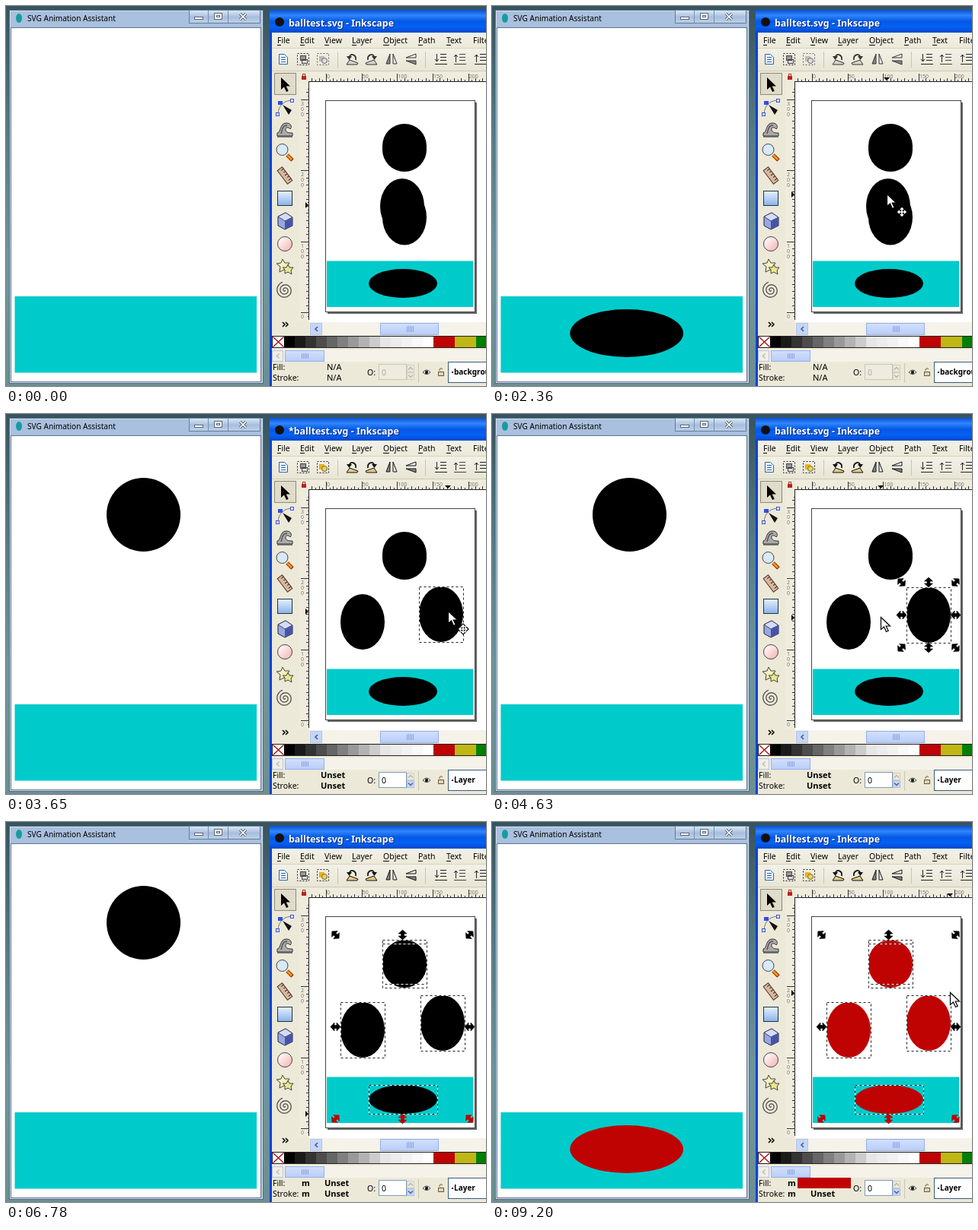
Animation of 630 by 500 pixels, one loop 9.3 s. Source, as an HTML page with a canvas:

```html
<!DOCTYPE html>
<html lang="en">
<head>
<meta charset="utf-8">
<title>Ball test</title>
<style>
html, body { margin: 0; width: 100%; height: 100%; overflow: hidden; }
canvas { display: block; }
</style>
</head>
<body>
<canvas id="stage" width="630" height="500"></canvas>
<script>
const g = document.getElementById('stage').getContext('2d');
const LOOP = 9300, TEAL = '#00cbcb', RED = '#bf0303', FACE = '#ece9d8';
const FONT = '"Noto Sans", "Open Sans", sans-serif';

// Cursor path: time, x, y
const PATH = [
  [670, 589, 55], [1150, 253, 450], [1520, 253, 450], [2240, 500, 236], [2360, 518, 248],
  [2400, 518, 248], [2900, 466, 258], [2980, 466, 258], [3210, 532, 274.5], [3260, 532, 274.5],
  [3650, 580, 260], [3700, 582, 261], [4220, 582, 261], [4860, 470, 272], [5070, 478, 277],
  [5160, 482, 277], [5240, 483, 270], [5440, 483, 270], [5520, 502, 180], [5600, 482, 191],
  [6180, 500, 360], [6400, 500, 360], [6690, 603, 384]
];
const PATH2 = [
  [7640, 606, 367], [7780, 560, 312], [8400, 560, 312], [8900, 608, 240], [9200, 601, 225]
];
// Preview poses: c top, l left, s squashed, r right, - empty
const POSES = `0- 1880c 2110l 2330s 2555r 2780c 3000l 3225s 3450r 3640c 3875l 4100s 4320r
  4540c 4760l 4960s 5070- 5160c 5440l 5560s 5800r 6020c 6240l 6440s 6620r 6780c 7070l
  7320s 7500r 7740c 7980l 8190s 8400r 8650c 8860l 9080s`
  .split(/\s+/).map(s => [parseInt(s), s.slice(-1)]);

function rect(x, y, w, h, fill) { g.fillStyle = fill; g.fillRect(x, y, w, h); }
function frame(x, y, w, h, color) {
  g.strokeStyle = color; g.lineWidth = 1; g.strokeRect(x + .5, y + .5, w - 1, h - 1);
}
function fade(x, y, w, h, ...colors) {
  const f = g.createLinearGradient(0, y, 0, y + h);
  colors.forEach((c, i) => f.addColorStop(i / (colors.length - 1), c));
  rect(x, y, w, h, f);
}
function oval(x, y, rx, ry, fill, stroke) {
  g.beginPath(); g.ellipse(x, y, rx, ry, 0, 0, 7);
  if (fill) { g.fillStyle = fill; g.fill(); }
  if (stroke) { g.strokeStyle = stroke; g.lineWidth = 1; g.stroke(); }
}
function shape(x, y, d, fill, stroke, width = 1, angle = 0) {
  const p = new Path2D(d);
  g.save(); g.translate(x, y); g.rotate(angle);
  if (fill) { g.fillStyle = fill; g.fill(p); }
  if (stroke) { g.strokeStyle = stroke; g.lineWidth = width; g.stroke(p); }
  g.restore();
}
function text(s, x, y, size = 10.5, color = '#000', weight = '') {
  g.font = `${weight} ${size}px ${FONT}`; g.fillStyle = color; g.fillText(s, x, y);
}
function along(path, t) {
  let i = 0;
  while (i < path.length - 2 && t > path[i + 1][0]) i++;
  const [a, ax, ay] = path[i], [b, bx, by] = path[i + 1];
  const k = Math.min(1, Math.max(0, (t - a) / (b - a)));
  return [ax + (bx - ax) * k, ay + (by - ay) * k];
}

function pointer(t) {
  if (t >= 670 && t < 6730) return along(PATH, t);
  if (t >= 7640) return along(PATH2, t);
}
function drag(t, from, to, start, end) {
  const [x, y] = along([[start, ...from], [end, ...to]], t);
  return { x, y, rx: 29, ry: 36.5 };
}
function scene(t) {
  const a = drag(t, [520, 263.5], [468, 273.5], 2400, 2900);
  const b = t < 3650 ? drag(t, [523, 278], [571, 263.5], 3260, 3650)
    : drag(t, [571, 263.5], [573, 264.5], 3650, 3700);
  const top = [184, 189].map(y => ({ x: 523, y, rx: 29, ry: 29 }));
  const flat = { x: 521, y: 365, rx: 45, ry: 19 };
  const picked = [];
  if ((t >= 2400 && t < 3260) || t >= 4860) picked.push(a);
  if (t >= 3260) picked.push(b);
  if (t >= 5500) picked.push(...top);
  if (t >= 6180) picked.push(flat);
  return {
    all: [...top, b, a, flat], picked,
    dragging: (t >= 2400 && t < 2900) || (t >= 3260 && t < 3700),
    dirty: (t >= 2420 && t < 3900) || (t >= 7320 && t < 7640)
  };
}

function preview(t, active) {
  fade(4, 5, 334, 492, ...(active ? ['#b4d0ef', '#7fa9d8'] : ['#a9c0de', '#a3bbdc']));
  frame(4, 5, 334, 492, '#53677f');
  frame(5, 6, 332, 490, '#d2e0f1');
  oval(17, 16, 4, 6, '#159ca0');
  text('SVG Animation Assistant', 28, 20, 10.1);
  fade(241, 6, 92, 17, '#dbe7f5', '#a7bfdd', '#bed2ea');
  frame(240, 5, 94, 18, '#667c98');
  rect(265, 6, 1, 16, '#7890ae'); rect(291, 6, 1, 16, '#7890ae');
  rect(248, 14, 11, 4, '#fff'); frame(247, 14, 12, 4, '#596675');
  rect(273, 10, 10, 8, '#fff'); frame(273, 9, 11, 9, '#596675'); frame(276, 12, 5, 3, '#596675');
  shape(311, 14, 'M-4-4L4 4M4-4L-4 4', 0, '#596675', 3.6);
  shape(311, 14, 'M-4-4L4 4M4-4L-4 4', 0, '#fff', 1.6);
  rect(7, 29, 328, 466, '#fff'); frame(6, 28, 329, 467, '#60748d');
  rect(11.5, 382, 317.5, 100.5, TEAL);
  const pose = POSES.filter(p => p[0] <= t).pop()[1];
  const moved = t >= 4220;
  const spot = {
    c: [180.5, 132.5, 48.5, 48.5],
    l: moved ? [89.5, 280.5, 48.5, 60.5] : [175, 264, 48.5, 60.5],
    s: [176.7, 430.5, 74.4, 31.5],
    r: moved ? [263, 265, 48.5, 60.5] : [180.5, 288, 48.5, 60.5]
  }[pose];
  if (spot) oval(...spot, t >= 8020 ? RED : '#000');
}

function toolbar(enabled) {
  // New document, select all, select in layers, deselect
  shape(364, 70, 'M-5.5-6.5H1.5L5.5-2.5V6.5H-5.5Z', '#f4f9ff', '#2864a8');
  shape(364, 70, 'M-3-2.5H3M-3 .5H3M-3 3.5H3', 0, '#2864a8');
  g.setLineDash([2, 2]);
  frame(382, 62, 16, 16, '#222'); frame(408, 62, 16, 16, enabled ? '#222' : '#666');
  g.setLineDash([]);
  rect(386, 65, 7, 6, '#999'); rect(388, 70, 8, 6, '#ddd'); frame(386, 65, 8, 7, '#444'); frame(388, 70, 8, 6, '#444');
  rect(411, 66, 7, 7, enabled ? '#e9b51c' : '#bbb'); oval(418, 72, 3.5, 3.5, enabled ? '#f1d33f' : '#ddd', '#666');
  rect(435, 60, 1, 21, '#c9c5b3'); rect(550, 60, 1, 21, '#c9c5b3');
  const ink = enabled ? '#111' : '#333', tint = enabled ? '#e0c98a' : '#d5d5d0';
  for (const [x, s] of [[454, 1], [480, -1]]) {
    g.save(); g.translate(x, 70); g.scale(s, 1);
    shape(0, 0, 'M-7 7L-3 1 8 5 7 7Z', tint, ink);
    shape(0, 0, 'M5 1C6-6-1-8-3-4', 0, ink, 1.8);
    shape(0, 0, 'M-7-4H0L-3.5 1Z', ink);
    g.restore();
  }
  for (const [x, a] of [[506, 0], [532, -Math.PI / 2]]) {
    shape(x, 70, 'M-2-7V6H-7Z', '#888', ink, 1, a);
    shape(x, 70, 'M2-7V6H7Z', '#eee', ink, 1, a);
  }
  [571, 596, 623].forEach((x, i) => {
    shape(x, 70, 'M-1-6.5H7M-1-2.5H7M-1 1.5H7M-8 6.5H8', 0, i == 1 ? '#444' : '#222', 1);
    shape(x, 70, i ? 'M-5.5 4V-6M-8-3L-5.5-6-3-3' : 'M-5.5-7V3M-8 0L-5.5 3-3 0', 0, '#222', 1);
  });
}

const ARROW = 'M0 0V16L4 12.5 7 19 9.7 17.7 6.7 11.5H12Z';
function tools() {
  rect(352, 88, 29, 29, '#e0dcca'); frame(352, 88, 29, 29, '#8d8a7c');
  shape(361, 94, ARROW, '#000');
  // Node editor
  shape(366, 133, 'M-9 9C-8-4 0-9 11-9', 0, '#777');
  shape(366, 133, 'M-3-3L9 4 5 10Z', '#111');
  [[355, 140, '#eef'], [358, 125, '#3050f0'], [374, 122, '#eef']].forEach(([x, y, c]) => {
    rect(x, y, 5, 5, c); frame(x - 1, y, 5, 5, '#3450d8');
  });
  // Tweak
  shape(366, 163, 'M-10 4C-5 4-7-9 2-9 8-9 10-4 7-1 5-4 0-4 1 0 2 4 6 4 10 4V8H-10Z', '#aaa', '#333');
  shape(366, 163, 'M-10 9H10M-5 5C-3-3-2-6 3-6', 0, '#555', 1.4);
  // Zoom
  shape(366, 193, 'M3 3L10 10', 0, '#a33a00', 5); shape(366, 193, 'M3 3L9 9', 0, '#ef9b25', 2.5);
  oval(362.5, 189, 7.5, 7.5, '#d8e9f7', '#444');
  // Measure
  shape(366, 223, 'M-4-11H4V11H-4Z', '#d8b99c', '#533', 1, -.65);
  shape(366, 223, 'M0-8H4M1-4H4M0 0H4M1 4H4M0 8H4', 0, '#422', 1, -.65);
  // Rectangle, box, ellipse
  fade(357, 244, 18, 18, '#e3f0ff', '#8cb4ea'); frame(356, 243, 20, 20, '#234');
  shape(366, 283, 'M-9-6L1-11 10-5V6L0 11-9 6Z', '#98a6e4', '#223');
  shape(366, 283, 'M-9-6L1-11 10-5 0 0Z', '#d5dcfa', '#446');
  shape(366, 283, 'M0 0L10-5V6L0 11Z', '#4655a8');
  const blush = g.createLinearGradient(358, 305, 374, 321);
  blush.addColorStop(0, '#fff'); blush.addColorStop(1, '#f6b5b5');
  oval(366, 313, 9.5, 9.5, blush, '#444');
  // Star
  shape(366, 343, 'M-3-10L0-5 6-5 3 0 5 6-1 4-7 7-6 0-11-4-5-5Z', '#f4f0bd', '#444');
  shape(370, 346, 'M0-6L2-2 7-2 4 2 5 7 0 4-4 6-4 1-7-2-2-2Z', '#ece68c', '#444');
  // Spiral
  g.beginPath();
  for (let a = 0; a < 17; a += .2) g.lineTo(366 + a * .65 * Math.cos(a), 374 + a * .65 * Math.sin(a));
  g.strokeStyle = '#444'; g.lineWidth = 1.2; g.stroke();
  shape(366, 419, 'M-3-3L0 0-3 3M1-3L4 0 1 3', 0, '#000', 1.5);
}

function rulers(mark) {
  rect(398, 87, 232, 12, '#efecdd'); rect(385, 99, 13, 316, '#efecdd');
  rect(398, 99, 232, 1, '#222'); rect(397, 99, 1, 314, '#222');
  rect(388, 92, 6, 5, '#b22'); frame(389, 89, 4, 4, '#a33');
  for (let i = -4; i < 46; i++) {
    const h = i % 10 == 0 ? 10 : i % 2 ? 2 : 4;
    rect(Math.round(420 + i * 4.67), 99 - h, 1, h, '#333');
    if (i % 10 == 0 && i >= 0) text(i * 5, 421 + i * 4.67, 95, 7, '#777');
  }
  for (let i = -1; i < 64; i++) {
    const y = Math.round(403 - i * 4.67), w = i % 20 == 0 ? 11 : i % 2 ? 2 : 4;
    if (y < 101) break;
    rect(398 - w, y, w, 1, '#333');
    if (i % 20 == 0) [...String(i * 5)].forEach((c, k) => text(c, 387, y + 8 + k * 7, 7, '#777'));
  }
  if (mark.x < 626 && mark.x > 398) shape(mark.x, 98, 'M-4-4H4L0 0Z', '#000');
  shape(397, mark.y, 'M-4-4V4L0 0Z', '#000');
}

function thumb(x, y, w, h) {
  fade(x, y, w, h, '#d3e0fd', '#b9cdf9'); frame(x, y, w, h, '#96aeea');
  for (let i = -4; i < 5; i += 2) rect(Math.round(x + w / 2) + i, y + 4, 1, h - 8, '#8ba4e0');
}
function scrollLeft(x, y, size, fill, color) {
  rect(x, y, size, size, fill); frame(x, y, size, size, '#b5c3e0');
  shape(x + size / 2, y + size / 2, 'M2-3L-1 0 2 3', 0, color, 1.7);
}

const HANDLE = 'M-6.5 0L-1.5-5.5V-2H1.5V-5.5L6.5 0 1.5 5.5V2H-1.5V5.5Z';
function selection({ picked, dragging }) {
  for (const o of picked) {
    const box = [Math.round(o.x - o.rx), Math.round(o.y - o.ry), 2 * o.rx + 1, 2 * o.ry + 1].map(Math.floor);
    frame(...box, '#fff');
    g.setLineDash([3, 3]); frame(...box, '#222'); g.setLineDash([]);
  }
  if (dragging || !picked.length) return;
  const xs = picked.flatMap(o => [o.x - o.rx, o.x + o.rx]), ys = picked.flatMap(o => [o.y - o.ry, o.y + o.ry]);
  const x0 = Math.min(...xs) - 6.5, x1 = Math.max(...xs) + 6.5, y0 = Math.min(...ys) - 6.5, y1 = Math.max(...ys) + 6.5;
  for (const i of [0, 1, 2]) for (const j of [0, 1, 2]) {
    if (i == 1 && j == 1) continue;
    const x = x0 + (x1 - x0) * i / 2, y = y0 + (y1 - y0) * j / 2;
    const angle = i == 1 ? Math.PI / 2 : j == 1 ? 0 : i == j ? Math.PI / 4 : -Math.PI / 4;
    const color = y > 335 ? RED : '#000';
    shape(x, y, HANDLE, color, color, .6, angle);
  }
}

function status(t, { picked }) {
  const grays = ['#000', '#1a1a1a', '#333', '#4d4d4d', '#666', '#808080', '#999', '#b3b3b3',
    '#ccc', '#e6e6e6', '#ececec', '#f2f2f2', '#f9f9f9', '#fff'];
  rect(349, 434, 281, 16, '#222');
  rect(350, 435, 15, 14, '#fff');
  shape(357.5, 442, 'M-7-6.5L7 6.5M7-6.5L-7 6.5', 0, '#a00', 1.2);
  grays.forEach((c, i) => rect(365 + 14 * i, 435, 14, 14, c));
  rect(561, 435, 28, 14, RED); rect(589, 435, 28, 14, '#bfb715'); rect(617, 435, 13, 14, '#008000');
  rect(349, 452, 281, 16, '#f4f2e9');
  scrollLeft(349, 453, 15, '#f0eee4', '#c4c2b8'); thumb(366, 453, 52, 15);

  text('Fill:', 350, 479); text('Stroke:', 350, 493);
  const n = picked.length, red = t >= 7320;
  const word = n ? 'Unset' : 'N/A', bold = n ? 'bold' : '';
  if (n > 1) { text('m', 388, 479, 11, '#000', 'bold'); text('m', 388, 493, 11, '#000', 'bold'); }
  const x = n ? (n > 1 ? 418 : 413) : 421;
  if (red) rect(401, 468, 70, 14, RED); else text(word, x, 479, 11, '#000', bold);
  text(word, x, 493, 11, '#000', bold);
  text('O:', 474, 486);
  rect(489, 471, 36, 21, n ? '#fff' : '#eeecdf'); frame(489, 471, 37, 21, n ? '#7f9db9' : '#c8c5b6');
  text('0', 493, 486, 10.5, n ? '#000' : '#aaa');
  // Only the lower step works while the value is zero
  [['M-3 1.5L0-1.5 3 1.5', 472, false], ['M-3-1.5L0 1.5 3-1.5', 482, n > 0]].forEach(([d, y, on]) => {
    rect(526, y, 10, 10, on ? '#c5d6fc' : '#ebe8dc'); frame(526, y, 10, 10, on ? '#a9bff0' : '#d2cfc0');
    shape(531, y + 5, d, 0, on ? '#4d6185' : '#b8b5a7', 1.4);
  });
  rect(541, 470, 1, 26, '#c9c5b3');
  shape(552, 482, 'M-5 0Q0-6 5 0Q0 5-5 0Z', '#fff', '#444'); oval(552, 482, 2.3, 2.3, '#222');
  rect(567, 481, 7, 5, '#e0d5b5'); frame(567, 481, 8, 6, '#665a3c');
  shape(571, 480, 'M-2 0V-2Q0-5 2-2', 0, '#665a3c');
  rect(580, 468, 50, 28, '#fff'); frame(580, 468, 60, 28, '#3c5a80');
  rect(585, 481, 2, 2, '#000');
  text(n ? 'Layer' : 'background', 588, 485, 10, '#000', 'bold');
}

function editor(t, active) {
  const s = scene(t);
  rect(346, 5, 284, 495, active ? '#0a43d6' : '#7b96df');
  fade(346, 5, 284, 30, ...(active ? ['#0c50d8', '#2f86fb', '#0558e6', '#0561f5', '#0148ca']
    : ['#7b96df', '#9db7ee', '#7b96df']));
  oval(359, 21, 6, 6, '#111');
  const title = (s.dirty ? '*' : '') + 'balltest.svg - Inkscape';
  text(title, 372, 28, 12.4, '#0a2a80', 'bold');
  text(title, 371, 27, 12.4, active ? '#fff' : '#d8e4f8', 'bold');
  rect(349, 35, 281, 465, FACE);
  fade(349, 35, 281, 20, '#f3f1e7', FACE);
  fade(349, 56, 281, 29, '#f3f1e7', '#e8e5d4');
  for (const [word, x] of [['File', 356], ['Edit', 386], ['View', 418], ['Layer', 454], ['Object', 495],
    ['Path', 541], ['Text', 578], ['Filters', 613]]) {
    text(word, x, 49);
    if (x < 600) rect(x, 51, Math.round(g.measureText(word[0]).width), 1, '#000');
  }
  rect(349, 55, 281, 1, '#d6d2c0'); rect(349, 85, 281, 1, '#d0ccba');
  toolbar(s.picked.length > 0);
  tools();

  // The ruler marks keep the last place where the pointer was on the canvas
  const p = pointer(t);
  const mark = p && p[0] > 398 ? { x: p[0], y: p[1] } : { x: 640, y: t < 2000 ? 262 : 384 };
  mark.y = Math.max(103, Math.min(410, mark.y));
  rulers(mark);

  rect(398, 100, 232, 316, '#fff');
  rect(422, 402, 196, 3, '#666'); rect(615, 127, 3, 278, '#666');
  rect(420, 124, 196, 279, '#fff'); frame(419, 124, 197, 279, '#444');
  rect(421, 335.5, 192, 60.5, TEAL);
  for (const o of s.all) oval(o.x, o.y, o.rx, o.ry, t >= 7320 ? RED : '#000');
  selection(s);

  rect(398, 416, 232, 17, '#f4f2e9');
  scrollLeft(399, 417, 16, '#c5d6fc', '#4d6185'); thumb(491, 417, 77, 16);
  status(t, s);
  return s;
}

function cursor(t, s) {
  const p = pointer(t);
  if (!p) return;
  const [x, y] = p.map(Math.round);
  shape(x + .5, y - .5, ARROW, '#fff', '#000', 1.2);
  const over = s.all.some(o => ((x - o.x) / o.rx) ** 2 + ((y - o.y) / o.ry) ** 2 < 1);
  if (!over && !s.dragging) return;
  const d = 'M-5 0H5M0-5V5M-3-2L-5 0-3 2M3-2L5 0 3 2M-2-3L0-5 2-3M-2 3L0 5 2 3';
  shape(x + 20, y + 23, d, 0, '#000', 4);
  shape(x + 20, y + 23, d, 0, '#fff', 1.6);
}

function draw(now) {
  const t = now % LOOP, leftActive = t >= 1310 && t < 2300;
  fade(0, 0, 630, 500, '#36545f', '#557a86', '#6f959c', '#6b8f92');
  preview(t, leftActive);
  const s = editor(t, !leftActive);
  cursor(t, s);
}

let start;
function tick(now) {
  start ??= now;
  draw(now - start);
  requestAnimationFrame(tick);
}
requestAnimationFrame(tick);
</script>
</body>
</html>
```
